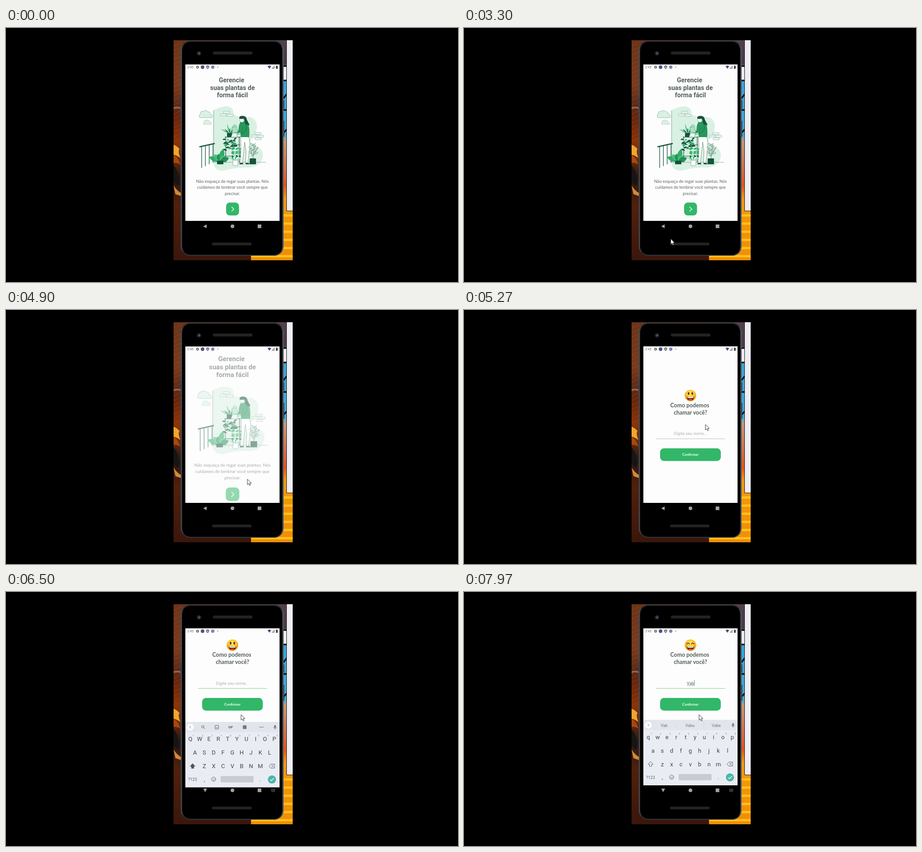
An HTML page that plays this animation: 998 by 561 pixels, repeating every 8000 ms.

```html
<!DOCTYPE html>
<html lang="pt">
<head>
<meta charset="utf-8">
<title>Plantas</title>
<style>
html, body { margin: 0; width: 100%; height: 100%; overflow: hidden; background: #000; }
svg { display: block; }
text { font-family: Roboto, sans-serif; text-anchor: middle; }
.jost { font-family: Lato, sans-serif; }
.bold { font-weight: 700; }
.line { fill: none; stroke: #5c6167; stroke-linecap: round; stroke-linejoin: round; }
</style>
</head>
<body>
<svg width="998" height="561" viewBox="0 0 998 561">
  <defs>
    <linearGradient id="fur" x2="0" y2="1">
      <stop offset="0" stop-color="#6b3418"/><stop offset=".2" stop-color="#7a3b1c"/>
      <stop offset=".3" stop-color="#5c2a18"/><stop offset=".36" stop-color="#6a260c"/>
      <stop offset=".46" stop-color="#8a3409"/><stop offset=".53" stop-color="#6e2c0c"/>
      <stop offset=".62" stop-color="#2b1812"/><stop offset=".75" stop-color="#51200c"/>
      <stop offset="1" stop-color="#3b160b"/>
    </linearGradient>
    <linearGradient id="paint" x2="0" y2="1">
      <stop offset="0" stop-color="#55404a"/><stop offset=".11" stop-color="#4c3a42"/>
      <stop offset=".12" stop-color="#eee"/><stop offset=".18" stop-color="#eee"/>
      <stop offset=".19" stop-color="#38a8d6"/><stop offset=".43" stop-color="#3cabd8"/>
      <stop offset=".46" stop-color="#c89a72"/><stop offset=".58" stop-color="#d8704a"/>
      <stop offset=".66" stop-color="#e2571a"/><stop offset=".72" stop-color="#f59a10"/>
      <stop offset="1" stop-color="#f08c0c"/>
    </linearGradient>
    <linearGradient id="edge" x2="1">
      <stop offset="0" stop-color="#3c434e"/><stop offset=".03" stop-color="#14161b"/>
      <stop offset=".97" stop-color="#14161b"/><stop offset="1" stop-color="#555c66"/>
    </linearGradient>
    <radialGradient id="face" cy=".35">
      <stop offset=".3" stop-color="#ffe04a"/><stop offset="1" stop-color="#f7a81d"/>
    </radialGradient>
    <clipPath id="record"><rect x="370" y="27" width="263" height="486"/></clipPath>
    <clipPath id="screen"><rect x="396" y="80.5" width="208" height="345.5"/></clipPath>
  </defs>

  <g clip-path="url(#record)">
    <rect x="370" y="27" width="180" height="486" fill="url(#fur)"/>
    <g id="streaks" fill="none" stroke="#a85a26" stroke-opacity=".4"/>
    <path d="M370 258Q377 260 383 267Q379 273 385 287Q377 281 370 280Z" fill="#f0a52c"/>
    <path d="M370 281Q380 284 385 302Q378 297 370 298Z" fill="#a8470d"/>
    <path d="M370 304Q378 310 382 330Q384 343 380 348Q374 346 370 338Z" fill="#171415"/>
    <path d="M370 348Q378 360 386 364V371L374 367Z" fill="#d08a35"/>
    <path d="M370 175Q380 172 387 176V179Q376 176 370 179Z" fill="#8a685a"/>
    <rect x="541" y="27" width="92" height="486" fill="url(#paint)"/>
    <path d="M612 84H620M612 116H620M612 156L620 146M612 181H620M612 232L620 224" stroke="#080808" stroke-width="3.5"/>
    <g id="stripes" stroke="#ffc414" stroke-width="5"/>
    <path d="M619.500 26V404H634V26Z" fill="#eeeef4" stroke="#101018"/>

    <rect x="386" y="28" width="227" height="475" rx="21" fill="url(#edge)"/>
    <rect x="386.800" y="28.800" width="225.400" height="473.400" rx="20" fill="none" stroke="#596069" stroke-width=".8"/>
    <rect x="389" y="31" width="221" height="469.500" rx="19" fill="#000"/>
    <path d="M386.500 153V178M613.500 160V178M613.500 205V240" stroke="#383f4c" stroke-width="2"/>
    <rect x="457" y="52" width="87" height="6.500" rx="2" fill="#232321"/>
    <rect x="455" y="474" width="87" height="6" rx="2" fill="#232321"/>
    <circle cx="426" cy="56" r="5" fill="#20222c"/><circle cx="426.500" cy="56" r="2.200" fill="#505878"/>
    <rect x="396" y="80.500" width="208" height="345.500" fill="#fdfdfd"/>

    <g clip-path="url(#screen)">
      <g id="welcome">
        <g class="bold" font-size="14" fill="#525f5c">
          <text x="498" y="120">Gerencie</text><text x="500" y="136.700">suas plantas de</text><text x="500" y="153.400">forma fácil</text>
        </g>
        <g id="art"></g>
        <g font-size="9.300" fill="#5b6361">
          <text class="jost" x="500" y="341.500">Não esqueça de regar suas plantas. Nós</text>
          <text class="jost" x="500" y="355">cuidamos de lembrar você sempre que</text>
          <text class="jost" x="500" y="368.500">precisar.</text>
        </g>
        <g id="next">
          <rect x="486" y="385.500" width="28.500" height="28.500" rx="8" fill="#32b768"/>
          <path d="M498 395L503 400L498 405" fill="none" stroke="#fff" stroke-width="1.400"/>
        </g>
      </g>
      <g id="ask">
        <rect x="396" y="80" width="208" height="347" fill="#fdfdfd"/>
        <g id="form">
          <circle cx="500" cy="189" r="12.700" fill="url(#face)"/>
          <path d="M491.500 191Q500 193 508.500 191Q508 200 500 200Q492 200 491.500 191Z" fill="#55250f"/>
          <path d="M492.500 191.500Q500 193 507.500 191.500L506.500 194Q500 195 493.500 194Z" fill="#fff"/>
          <ellipse cx="500" cy="198" rx="4" ry="1.700" fill="#ef4d3c"/>
          <g id="open" fill="#55250f"><ellipse cx="496" cy="184.500" rx="1.700" ry="3"/><ellipse cx="504" cy="184.500" rx="1.700" ry="3"/></g>
          <path id="smiling" d="M492 186.500Q495 181.500 498 186.500M502 186.500Q505 181.500 508 186.500" fill="none" stroke="#55250f" stroke-width="1.500" stroke-linecap="round"/>
          <g class="bold" font-size="12.300" fill="#525f5c">
            <text class="jost" x="498.500" y="214.500">Como podemos</text><text class="jost" x="500" y="230.500">chamar você?</text>
          </g>
          <text id="entry" x="500" y="276" font-size="9.200"></text>
          <path id="caret" stroke="#5a7f8c" stroke-width="1"/>
          <path id="compose" stroke="#77837c" stroke-width=".7"/>
          <path id="under" d="M424 284.500H576.500"/>
          <rect x="433" y="305.500" width="134" height="28" rx="8.500" fill="#32b768"/>
          <text class="jost bold" x="500" y="322.200" font-size="8" fill="#fff">Confirmar</text>
        </g>
      </g>
      <g fill="#62666b">
        <text x="407" y="89.200" font-size="7">2:45</text>
        <circle cx="423" cy="86.500" r="2.100" fill="none" stroke="#555" stroke-width="1.700"/>
        <circle cx="434" cy="86.500" r="3.900" fill="#50527c"/>
        <path d="M442 84L445.300 82.500L448.500 84Q449 88.500 445.300 90.500Q441.500 88.500 442 84Z"/>
        <circle cx="445.300" cy="86.500" r="1.200" fill="#fff"/>
        <circle cx="456.500" cy="86.500" r="3.700" fill="#7c86b5"/><circle cx="467.500" cy="86.500" r="1"/>
        <path d="M577.500 84.500Q581.500 81.500 585.500 84.500L581.500 90Z" fill="#484c78"/>
        <path d="M587 89.500L592.500 83.500V89.500Z" fill="#bbb" stroke="#666" stroke-width=".7"/>
        <path d="M596 84H597V83H599V84H600V90H596Z" fill="#444"/>
      </g>
    </g>

    <g id="keyboard">
      <rect x="396" y="282.500" width="208" height="144.500" fill="#eaecf4"/>
      <rect x="396" y="282.500" width="208" height="22.500" fill="#e3e5ed"/>
      <g id="keys"></g>
      <g id="tools">
        <g class="line">
          <circle cx="434.500" cy="293" r="2.600"/><path d="M436.500 295L439 297.700"/>
          <rect x="461.500" y="290" width="8" height="8" rx="1.500"/><path d="M463.500 294.500Q465.500 297 467.500 294.500"/>
        </g>
        <text x="496" y="296.500" font-size="6.500" class="bold" fill="#5c6167">GIF</text>
        <rect x="523" y="290" width="8" height="8" fill="#73777e"/>
        <g fill="#5c6167"><circle cx="560.700" cy="294" r="1"/><circle cx="564" cy="294" r="1"/><circle cx="567.300" cy="294" r="1"/></g>
      </g>
      <g id="hints" font-size="8.800" fill="#70757d">
        <path d="M469 288V301M529.500 288V301" stroke="#ccd0d7" stroke-width=".7"/>
        <text x="442" y="297.700"></text><text x="499" y="297.700"></text><text x="557" y="297.700"></text>
      </g>
      <circle cx="407" cy="294" r="7.500" fill="#fff"/><path id="chevron" class="line"/>
      <rect x="592.500" y="289.500" width="3" height="6" rx="1.500" fill="#5c6167"/><path class="line" d="M591 294Q591 297 594 297Q597 297 597 294M594 297V299" stroke-width=".8"/>
      <path id="shift" d="M412 374.500L406.500 380.500H409.500V385H414.500V380.500H417.500Z" stroke="#50545a" stroke-width=".9"/>
      <path class="line" d="M581 380L585 375.500H593V384.500H585ZM586.500 378L590.500 382M590.500 378L586.500 382"/>
      <text x="412" y="412.500" font-size="9" fill="#5c6167">?123</text>
      <text x="438" y="413" font-size="12" fill="#444">,</text><text x="561.500" y="413" font-size="12" fill="#444">.</text>
      <circle class="line" cx="458.500" cy="409" r="4.700"/><path class="line" d="M456.500 410.500Q458.500 412.500 460.500 410.500M456.800 407.500V408M460.200 407.500V408"/>
      <rect x="474" y="402" width="72.500" height="14" rx="2" fill="#c9cbd1"/>
      <circle cx="587.200" cy="409.500" r="9" fill="#4bb5a8"/><path d="M583 409.700L586 412.500L591.500 406.500" fill="none" stroke="#fff" stroke-width="1.300"/>
    </g>

    <g fill="#a3a3a3">
      <path id="back"/><circle cx="500" cy="438" r="4"/><rect x="555.700" y="434" width="8" height="8"/>
      <g id="switcher" fill="none" stroke="#777" stroke-width=".9"><rect x="586.500" y="435.500" width="7" height="4.500"/><path d="M588 437.500H592M589 441.500H591"/></g>
    </g>
    <path id="cursor" d="M0 0V12L2.800 9.500L4.800 13.700L6.800 12.800L4.900 8.700H8.600Z" fill="#fff" stroke="#222" stroke-width=".9"/>
  </g>
</svg>
<script>
const $ = id => document.getElementById(id);
const set = (id, attrs) => { for (const k in attrs) $(id).setAttribute(k, attrs[k]); };
const show = (id, on) => set(id, { visibility: on ? 'visible' : 'hidden' });
const clamp = x => Math.max(0, Math.min(1, x));
const span = (t, a, b) => clamp((t - a) / (b - a));
const out = x => 1 - (1 - x) ** 3;
const range = n => [...Array(n).keys()];

const DARK = '#16533c', GREEN = '#2fae66', LIGHT = '#a9e2c1', OUTLINE = '#4d7762';
const path = (d, fill = 'none', stroke = 'none', width = .7) =>
  `<path d="${d}" fill="${fill}" stroke="${stroke}" stroke-width="${width}"/>`;
const box = (x, y, w, h, fill, stroke = 'none') =>
  `<rect x="${x}" y="${y}" width="${w}" height="${h}" rx="1" fill="${fill}" stroke="${stroke}" stroke-width=".6"/>`;
const leaf = (x, y, len, angle, w, fill, stroke = 'none') =>
  `<path transform="translate(${x} ${y}) rotate(${angle})" d="M0 0Q${len / 2} ${-w} ${len} 0Q${len / 2} ${w} 0 0Z" fill="${fill}" stroke="${stroke}" stroke-width=".5"/>`;
const fan = (x, y, n, from, to, len, w, colors) => range(n).map(i =>
  leaf(x, y, len * (.75 + .25 * Math.sin(i * 2.3 + 1)), from + (to - from) * i / (n - 1), w, colors[i % colors.length])).join('');
const foliage = (x, y, w, h, n, colors) => range(n).map(i =>
  leaf(x + (i * 17.3) % w, y + (i * 9.7) % h, 8, Math.sin(i * 5) * 40, 3.5, colors[i % colors.length])).join('');

function scenery() {
  const cloud = 'M428 198Q424 193 429 190Q428 183 436 184Q441 180 446 185Q451 185 451 190Q458 192 455 198Z';
  const bricks = [[480, 184], [473, 190], [488, 191], [549, 231], [541, 236.5], [555, 237], [550, 242.5]];
  return path('M458.500 181Q474 174 485 173Q504 173 502 191Q510 196 527 196Q553 195 554 216Q553 237 541 246Q536 262 552 262Q569 266 567 286Q559 310 532 308Q505 308 482 315Q463 317 458 300Z', '#d9f1e3')
    + path('M458.500 182V296', 'none', '#75a592', 1)
    + path('M456 296.500H574', 'none', '#6b8f80')
    + path(cloud, '#d9f1e3', '#75a592')
    + `<g transform="translate(180 88) scale(.6 .63)">${path(cloud, '#d9f1e3', '#75a592')}</g>`
    + bricks.map(([x, y]) => box(x, y, 14, 4.3, '#eefaf4', '#6b9a87')).join('');
}

function railing() {
  const posts = range(4).map(i => path(`M${432 + i * 8.3} ${261 - i * 1.8}V${309 - i * 4}`, 'none', DARK, 1.3));
  return posts.join('') + path('M427 262.500L461 255', 'none', DARK, 2.6);
}

function shelf() {
  return path('M485 240V297M515 240V297M483 241H517M481 258H517M481 283H521', 'none', DARK, 1.2)
    + foliage(478, 246, 28, 22, 36, [DARK, '#e8f7ee', DARK, GREEN])
    + foliage(490, 266, 26, 24, 40, [GREEN, '#4bbc7c', LIGHT, GREEN, DARK])
    + fan(494, 234, 9, -150, -30, 23, 2, [GREEN, DARK, LIGHT]) + box(488, 232, 12, 9, DARK);
}

function woman() {
  return path('M518 240H536Q540 254 537 272L534 298H529L530 272L527 252L522 298H517Q520 270 518 240Z', '#fff', OUTLINE)
    + path('M516 298H523L524 301H515ZM529 298H535L539 301H529Z', DARK)
    + path('M517 208Q526 204 534 208Q539 222 537 241H518Z', '#27985a')
    + path('M517 209Q513 218 514 226L506 230L507 234L519 230L523 219', '#27985a', DARK, .5)
    + path('M530 212Q533 226 525 231L510 236', 'none', DARK, .7)
    + path('M516 199H524V208H519Q516 207 516 199Z', '#fff', OUTLINE, .5)
    + path('M515 200Q514 194 522 194Q531 194 532 203Q535 209 538 214Q534 215 528 211L525 200Q520 202 515 200Z', DARK)
    + path('M499 219Q506 217 510 221L512 231H500ZM500 220Q504 207 511 219', LIGHT, '#4b9d78')
    + path('M500 232L497 241H510V232Z', '#e9f8ef', '#4b9d78');
}

function pots() {
  let s = fan(473, 294, 6, -160, -20, 28, 11, [GREEN, '#4bbc7c', '#238f58']) + box(466, 293, 14, 8, DARK);
  s += fan(506, 293, 7, -150, -30, 18, 4, [LIGHT, GREEN, '#fff']) + box(501, 292, 11, 12, '#fff', OUTLINE);
  s += path('M545 289Q548 270 550 254M546 283L539 267M547 280L557 263', 'none', DARK);
  for (const i of range(14))
    s += leaf(546 + (i % 3 - 1) * 4, 282 - i * 1.8, 7, i % 2 ? -150 : -30, 3, '#e7f8ee', DARK);
  return s + box(538, 288, 14, 13, DARK);
}

$('streaks').innerHTML = range(22).map(i => `<path d="M370 ${40 + i * 10}L388 ${32 + i * 10}"/>`).join('');
$('stripes').innerHTML = range(6).map(i => `<path d="M541 ${414 + i * 18}H633"/>`).join('');
$('art').innerHTML = scenery() + railing() + shelf() + woman() + pots();

const PITCH = 20.6;
const rows = [['QWERTYUIOP', 407, 324.7], ['ASDFGHJKL', 417.3, 354.5], ['ZXCVBNM', 438, 384.5]];
$('keys').innerHTML = rows.map(([letters, x, y]) => [...letters].map((c, i) =>
  `<text class="key" x="${x + i * PITCH}" y="${y}" font-size="13" fill="#3f4349">${c}</text>`).join('')).join('')
  + range(10).map(i => `<text x="${413.5 + i * PITCH}" y="314.700" font-size="5" fill="#7b83a0">${(i + 1) % 10}</text>`).join('');
const keys = [...document.querySelectorAll('.key')];
const hints = [...$('hints').querySelectorAll('text')];

const NAME = 'Vab', TYPED = [7080, 7430, 7850];
// time, x, y of the pointer tip
const TRACK = [[2470, 435, 511], [3270, 454, 469], [3930, 508, 400], [4630, 508, 400],
  [4900, 533, 374], [5240, 533, 253], [5300, 533, 253], [5470, 521, 263], [5600, 519, 271]];

function pointer(t) {
  const i = TRACK.findIndex(k => k[0] > t);
  if (i < 0) return TRACK[TRACK.length - 1].slice(1);
  const [t0, x0, y0] = TRACK[i - 1], [t1, x1, y1] = TRACK[i], p = span(t, t0, t1);
  return [x0 + (x1 - x0) * p, y0 + (y1 - y0) * p];
}

const zoom = s => `translate(500 253) scale(${s}) translate(-500 -253)`;

function draw(t) {
  const p = out(span(t, 4820, 5220));
  set('welcome', { transform: zoom(1 + p * .1), opacity: 1 - span(p, .1, .9) });
  set('ask', { transform: zoom(.85 + p * .15), opacity: span(p, .75, .875) });
  set('next', { opacity: t < 4230 ? 1 : .7 + .3 * span(t, 4300, 4470) });

  const focus = t >= 6170, raised = t >= 6300;
  const word = NAME.slice(0, TYPED.filter(k => t >= k).length), lower = word.length > 0;
  set('form', { transform: `translate(0 ${raised ? -71.5 : 0})` });
  set('under', { stroke: focus ? '#78cf77' : '#a9aeb2', 'stroke-width': focus ? 1.1 : .8 });
  $('entry').textContent = word || 'Digite seu nome...';
  set('entry', { fill: lower ? '#52665a' : '#aeb1b0' });
  const half = lower ? $('entry').getComputedTextLength() / 2 : 0;
  set('caret', { d: lower ? `M${500.5 + half} 266.500V278.500` : '' });
  set('compose', { d: lower ? `M${500 - half} 278H${500 + half}` : '' });
  show('open', !lower);
  show('smiling', lower);

  const rise = span(t, 6210, 6600);
  set('keyboard', { opacity: span(t, 6210, 6400), transform: `translate(0 ${30 * (1 - rise) ** 1.38})` });
  for (const key of keys) key.textContent = lower ? key.textContent.toLowerCase() : key.textContent.toUpperCase();
  show('tools', !lower);
  show('hints', lower);
  ['', 'u', 'e'].forEach((end, i) => hints[i].textContent = word + end);
  set('chevron', { d: lower ? 'M406 291.500L408.500 294L406 296.500' : 'M408 291.500L405.500 294L408 296.500' });
  set('shift', { fill: lower ? 'none' : '#50545a' });
  set('back', { d: focus ? 'M435.500 434.200H444L439.700 442Z' : 'M443 433.800V442.200L435.500 438Z' });
  show('switcher', focus);

  show('cursor', t >= 2470);
  if (t >= 2470) set('cursor', { transform: `translate(${pointer(t)})` });
}

const start = performance.now();
function tick() {
  draw((performance.now() - start) % 8000);
  requestAnimationFrame(tick);
}
tick();
</script>
</body>
</html>
```
